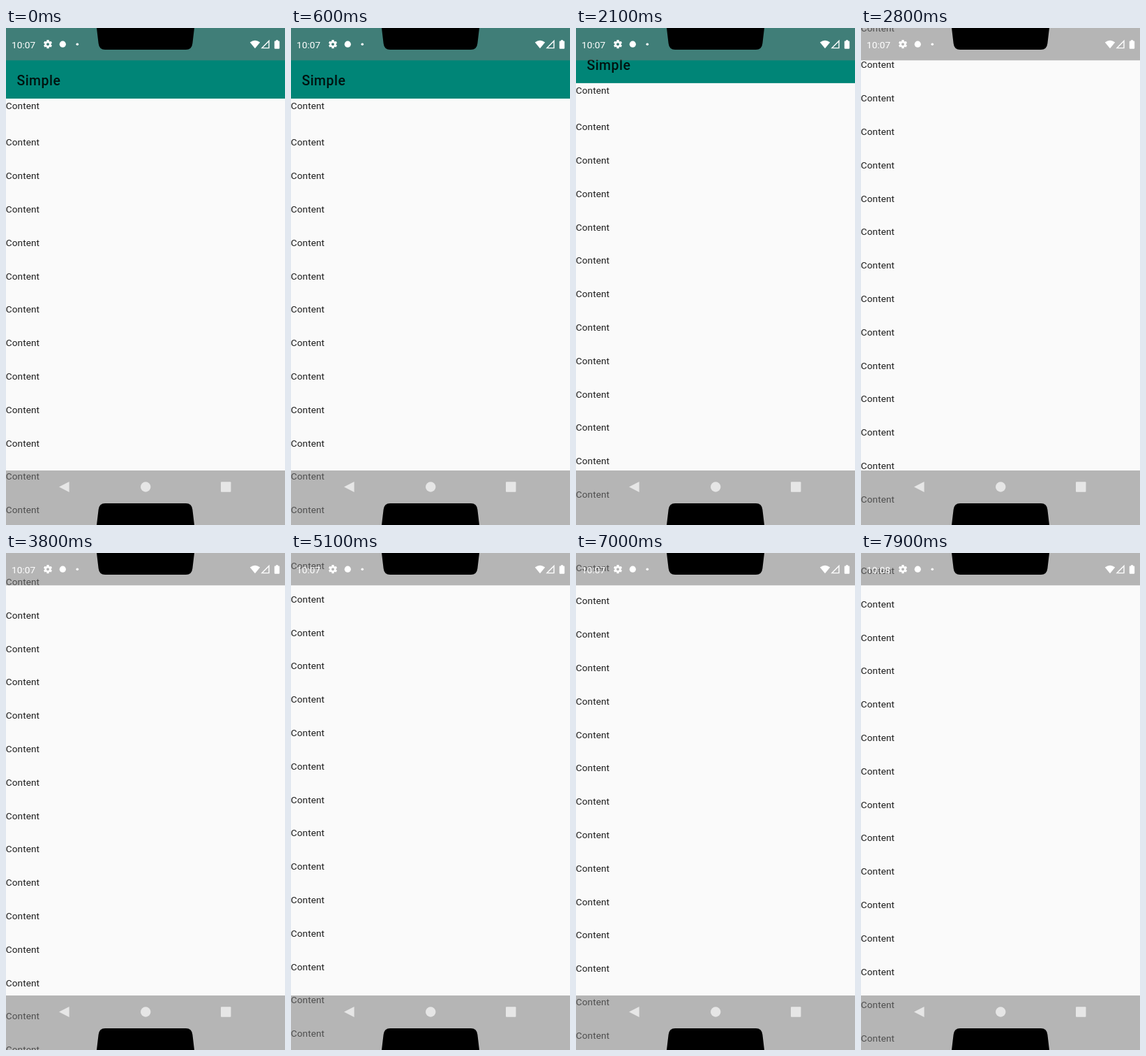
These frames come from a looping animation (400x711 px, 8 s). An HTML page:

```html
<!DOCTYPE html>
<html lang="en">
<head>
<meta charset="utf-8">
<title>Scrolling list</title>
<style>
  html, body { margin: 0; width: 100%; height: 100%; overflow: hidden; background: #fafafa; }
  svg { display: block; width: 100vw; height: 100vh; }
  text { font-family: Roboto, "Noto Sans", sans-serif; }
  .row { font-size: 13.62px; letter-spacing: .08px; fill: #1f1f1f; }
  .title { font-size: 19.45px; font-weight: 500; letter-spacing: .5px; fill: #001310; }
  .clock { font-size: 13.7px; }
  .veil { fill: #797979; fill-opacity: .53; }
</style>
</head>
<body>
<svg viewBox="0 0 400 711">
  <rect width="400" height="711" fill="#fafafa"/>
  <g id="page">
    <g id="rows"></g>
    <rect y="-20" width="400" height="121" fill="#008577"/>
    <text class="title" x="15.4" y="82">Simple</text>
  </g>
  <rect class="veil" width="400" height="46.3"/>
  <rect class="veil" y="633" width="400" height="78"/>

  <g fill="#fff" color="#fff">
    <text id="clock" class="clock" x="8" y="28.5">10:07</text>
    <g id="gear" transform="translate(60 23.2)">
      <circle r="3.3" fill="none" stroke="currentColor" stroke-width="2.6"/>
    </g>
    <circle cx="81.3" cy="23.2" r="4.6"/>
    <circle cx="102.3" cy="23.2" r="1.8"/>
    <path d="M349.8 20.6Q357 14.8 364.2 20.6L357 29.3Z"/>
    <path d="M377 18.4V28.6H367Z" fill="none" stroke="currentColor" stroke-width="1.4"/>
    <path d="M387 17.2H390V18.4H391.2Q392.2 18.4 392.2 19.4V28.8Q392.2 29.8 391.2 29.8H385.8Q384.8 29.8 384.8 28.8V19.4Q384.8 18.4 385.8 18.4H387Z"/>
  </g>

  <g fill="#e6e6e6">
    <path d="M76 656.5L90.6 649V664Z"/>
    <circle cx="200.2" cy="656.5" r="7.2"/>
    <rect x="308" y="649.3" width="14.5" height="14.5" rx="1"/>
  </g>

  <path id="notch" d="M130 0L132.6 22Q133.6 31 142 31H258Q266.4 31 267.4 22L270 0Z"/>
  <use href="#notch" transform="translate(0 711) scale(1 -1)"/>
</svg>
<script>
  const LOOP = 8000, STEP = 100, PITCH = 47.8, ROWS = 28;
  const NS = "http://www.w3.org/2000/svg";
  const $ = id => document.getElementById(id);

  // Each swipe decelerates to rest; times in ms, distance in px.
  const swipes = [
    { at: 2000, lasts: 1300, by: 122 },
    { at: 3557, lasts: 1260, by: 115.9 },
    { at: 5090, lasts: 850, by: 104.1 },
    { at: 6580, lasts: 900, by: 50 },
    { at: 7480, lasts: 900, by: 102.1 }
  ];

  const clamp = u => Math.min(1, Math.max(0, u));
  const easeOut = u => 1 - (1 - u) ** 2.5;
  const scrollAt = t => swipes.reduce(
    (sum, { at, lasts, by }) => sum + by * easeOut(clamp((t - at) / lasts)), 0);

  function add(parent, tag, attrs, text = "") {
    const node = document.createElementNS(NS, tag);
    for (const key in attrs) node.setAttribute(key, attrs[key]);
    node.textContent = text;
    parent.append(node);
  }

  for (let i = 0; i < ROWS; i++) {
    const y = i ? 168.3 + (i - 1) * PITCH : 116;
    add($("rows"), "text", { class: "row", x: -0.2, y }, "Content");
  }

  for (let i = 0; i < 6; i++) {
    add($("gear"), "rect", {
      x: -1.6, y: -6.1, width: 3.2, height: 2.6, rx: .4, transform: `rotate(${i * 60})`
    });
  }

  function draw(t) {
    $("page").setAttribute("transform", `translate(0 ${-scrollAt(t)})`);
    $("clock").textContent = t < 7800 ? "10:07" : "10:08";
  }

  const start = performance.now();
  function tick() {
    const t = (performance.now() - start) % LOOP;
    draw(Math.floor(t / STEP) * STEP);
    requestAnimationFrame(tick);
  }
  tick();
</script>
</body>
</html>
```
